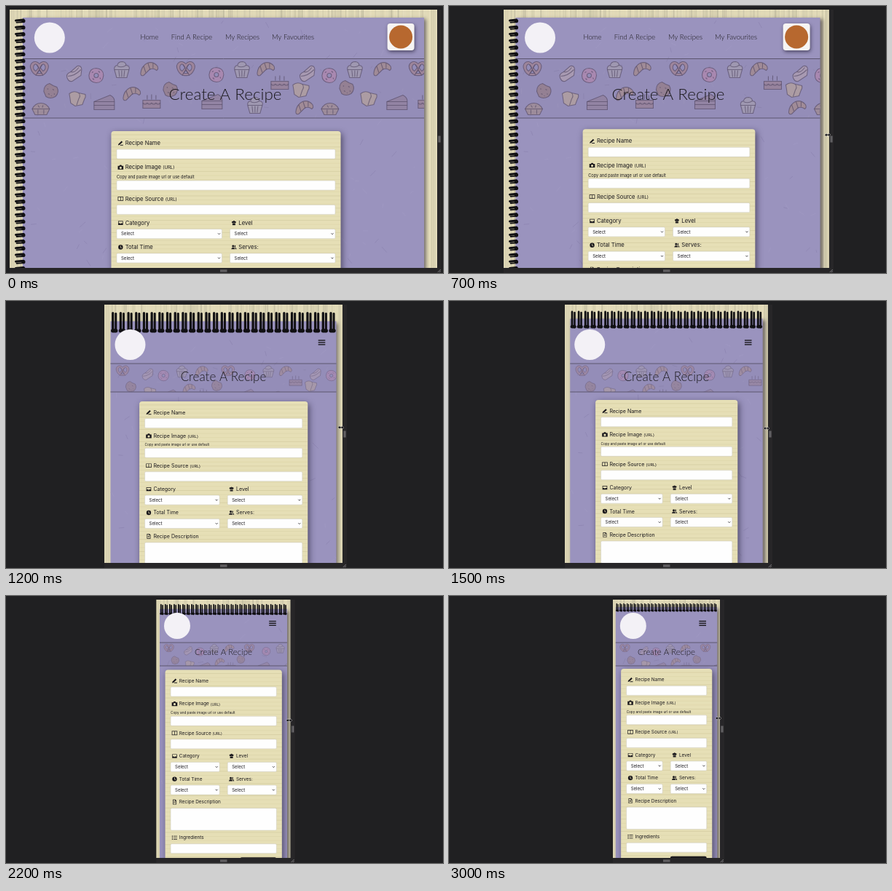
Recreate the animation shown at these times as an HTML page with a canvas. Size 600x367 px, loop 3100 ms.

```html
<!DOCTYPE html>
<html lang="en">
<head>
<meta charset="utf-8">
<title>Responsive recipe form</title>
<style>
  html, body { margin: 0; width: 100%; height: 100%; overflow: hidden; background: #202022; }
  canvas { display: block; width: 600px; height: 367px; }
</style>
</head>
<body>
<canvas></canvas>
<script>
const LOOP = 3100, STEP = 100, MID = 298.5, TOP = 5, BOTTOM = 360;
const INK = '#1b191d', BADGE = '#f3f1f6';
const canvas = document.querySelector('canvas');
const ctx = canvas.getContext('2d');
const ratio = window.devicePixelRatio || 1;
canvas.width = 600 * ratio;
canvas.height = 367 * ratio;

// Half the viewport width over time
const halfWidths = [[0, 293.5], [200, 287.3], [350, 274], [500, 254.5], [600, 238.5], [1000, 178.5],
  [1200, 163.5], [1500, 139.5], [1800, 105.5], [1900, 98], [2400, 88.5], [2500, 82.5], [3000, 73.5]];
const cursorHeights = [[0, 183], [500, 180], [1000, 173], [1500, 175], [1900, 172], [3000, 168]];

const layouts = {
  wide:   { lines: [72.5, 154], title: [301, 121, 22.4], label: 7.7, caption: 5.65, first: 16.5, row: 33.3, extra: 9.8, scale: 1 },
  medium: { lines: [86, 125], title: [298.5, 104, 17], label: 7, caption: 4.7, first: 15.2, row: 32.4, extra: 8.3, scale: .72 },
  small:  { lines: [64, 96], title: [298.5, 77.5, 11.4], label: 6.4, caption: 4.7, first: 15, row: 31.6, extra: 8.6, scale: .55 }
};

const icons = {
  pen: 'M-3 1.2L1.3-3 2.8-1.5-1.3 2.3-3.4 3ZM0 2.2H3.5V3.2H-1Z',
  camera: 'M-3.8-2H-1.8L-1-3.2H1L1.8-2H3.8V3H-3.8ZM-1.6.5a1.6 1.6 0 1 0 3.2 0a1.6 1.6 0 1 0-3.2 0Z',
  book: 'M-3.8-2.8H3.8V2.8H-3.8ZM-3.1-2.1V2.1H-.35V-2.1ZM.35-2.1V2.1H3.1V-2.1Z',
  tray: 'M-3.3-2.6H3.3V2.7H-3.3ZM-2.6-1.9V.4H-1Q0 2 1 .4H2.6V-1.9Z',
  hat: 'M-2 .2Q-4-1-2.4-2.3-1-2.2-1-2.4 0-4 1.2-2.4 1-2.2 2.4-2.3 4-1 2 .2ZM-2 .8H2V3H-2Z',
  clock: 'M-3.2 0a3.2 3.2 0 1 0 6.4 0a3.2 3.2 0 1 0-6.4 0ZM-.4-2H.3V0L1.7 1 1.3 1.5-.4.4Z',
  people: 'M-2.6-1.4a1.5 1.5 0 1 0 3 0a1.5 1.5 0 1 0-3 0ZM-3.6 2.8Q-3.4.4-1 .4 1.3.4 1.5 2.8ZM1-2.8Q3-2.4 2.2-.4L1 .2Q3.6.6 3.6 2.8H2.2Q2.2 1 .8.3Z',
  file: 'M-2.5-3.4H1L2.5-1.9V3.4H-2.5ZM-1.8-2.7V2.7H1.8V-1.4H.5V-2.7ZM-1.2-.6H1.2V0H-1.2ZM-1.2.8H1.2V1.4H-1.2Z',
  list: 'M-3.6-2.6h1.2v1.1h-1.2ZM-1.5-2.4h5v.7h-5ZM-3.6-.5h1.2v1.1h-1.2ZM-1.5-.3h5v.7h-5ZM-3.6 1.6h1.2v1.1h-1.2ZM-1.5 1.8h5v.7h-5Z'
};

// Pastry: fill, outline with holes, inner strokes
const pastries = {
  pretzel: ['#a4818c', 'M0-7C6-14 16-8 11 2Q7 10 0 9-7 10-11 2C-16-8-6-14 0-7ZM1-2Q5-10 8-4 9 1 5 3ZM-1-2Q-5-10-8-4-9 1-5 3ZM-3 6L0 2 3 6Z', 'M-5 9L4-6M5 9L-4-6'],
  eclair: ['#b4a1b0', 'M-10 6Q-12 1-5-2L4-10Q10-11 10-5L9 3-3 11Q-8 12-10 6Z', 'M-9 4Q0 4 9-5M-5-2Q0 0 6-8'],
  donut: ['#b486ad', 'M-10 0Q-9-10 0-10 10-9 10 0 9 10 0 10-10 9-10 0ZM-3 0a3 3 0 1 0 6 0a3 3 0 1 0-6 0', 'M-6-4l2-1M3-6l2 2M5 3l1 2M-5 4l2 2'],
  cupcake: ['#a79eae', 'M-10 0Q-11-5-6-6-5-11 1-11 6-10 6-6 12-5 10 0L7 11H-7Z', 'M-10 0H10M-4 1L-3 10M0 1V10M4 1L3 10M-6-5Q0-2 6-6'],
  croissant: ['#a88b86', 'M-12 6Q-11-4-3-8 5-11 11-4 13 0 10 2 5-2 0 1-4 5-8 9-12 10-12 6Z', 'M-8-4L-5 5M-2-8L1 1M5-8L5-1'],
  cake: ['#9a7f8f', 'M-12-1H12V10H-12Z', 'M-12 3Q-9 6-6 3-3 6 0 3 3 6 6 3 9 6 12 3M-6-2V-8M0-2V-9M6-2V-8'],
  cookie: ['#957a80', 'M-10 1Q-10-8-2-10L3-7 8-5Q12 2 6 8-1 12-7 8Z', 'M-5-3l1 1M2-2l2 1M-4 4l2 1M4 4l1 1M0 7l1 0'],
  toast: ['#bba599', 'M-11-6Q-5-11 2-7L11-5Q12-1 10 1L7 9-3 11-9 7-10 0Z', 'M2-7Q5-3 2 1L-1 10'],
  slice: ['#937f98', 'M-14-1L8-10Q14-7 14-2V10H-14Z', 'M-14-1H14M-14 4H14'],
  pie: ['#a48d8c', 'M-12 0Q-8-8 0-8 8-8 12 0L8 8H-8Z', 'M-12 0H12M-4-5L-2-2M3-5L2-2M-4 1V7M4 1V7']
};
const spots = {
  pretzel: [[23, 14], [224, 14], [543, 14]],
  eclair: [[71, 20], [391, 20]],
  donut: [[101, 23], [266, 22], [421, 23]],
  cupcake: [[136, 15], [301, 15], [456, 15], [319, 64]],
  croissant: [[174, 14], [334, 14], [494, 14], [150, 48], [387, 67]],
  cake: [[353, 32], [177, 58], [555, 58]],
  cookie: [[39, 44], [203, 42], [445, 40]],
  toast: [[75, 54], [475, 54], [382, 42]],
  slice: [[112, 60], [260, 59], [514, 60]],
  pie: [[25, 69], [422, 69]]
};

const random = (i, salt) => {
  const v = Math.sin(i * 12.9898 + salt * 78.233) * 43758.5453;
  return v - Math.floor(v);
};

function track(keys, t) {
  const i = keys.findIndex(k => k[0] >= t);
  if (i < 0) return keys[keys.length - 1][1];
  if (i === 0) return keys[0][1];
  const [[t0, a], [t1, b]] = [keys[i - 1], keys[i]];
  return a + (b - a) * (t - t0) / (t1 - t0);
}

function rect(x, y, w, h, fill) {
  ctx.fillStyle = fill;
  ctx.fillRect(x, y, w, h);
}

function box(x, y, w, h, r, fill, stroke) {
  ctx.beginPath();
  ctx.roundRect(x, y, w, h, r);
  ctx.fillStyle = fill;
  ctx.fill();
  if (stroke) { ctx.strokeStyle = stroke; ctx.lineWidth = .5; ctx.stroke(); }
}

function disc(x, y, r, fill) {
  ctx.beginPath();
  ctx.arc(x, y, r, 0, 7);
  ctx.fillStyle = fill;
  ctx.fill();
}

function line(x1, y1, x2, y2, width, color) {
  ctx.beginPath();
  ctx.moveTo(x1, y1);
  ctx.lineTo(x2, y2);
  ctx.lineWidth = width;
  ctx.strokeStyle = color;
  ctx.stroke();
}

function text(str, x, y, size, font = 'Inter', align = 'left') {
  ctx.font = `${font === 'Lato' ? 300 : 400} ${size}px ${font}, sans-serif`;
  ctx.textAlign = align;
  ctx.textBaseline = 'alphabetic';
  ctx.fillStyle = INK;
  ctx.fillText(str, x, y + size * .35);
  return ctx.measureText(str).width;
}

function shadowed(blur, dx, dy, draw) {
  ctx.save();
  ctx.shadowColor = 'rgba(25,20,40,.6)';
  ctx.shadowBlur = blur * ratio;
  ctx.shadowOffsetX = dx * ratio;
  ctx.shadowOffsetY = dy * ratio;
  draw();
  ctx.restore();
}

function drawWood(left, right) {
  rect(left, TOP, right - left, BOTTOM - TOP, '#dfd8b7');
  const shades = ['#eee6c5', '#c9c3a4', '#b3ae95', '#e8dfb9'];
  for (let x = left, i = 0; x < right; x += 2.4, i++) {
    ctx.globalAlpha = .15 + random(i, 1) * .4;
    rect(x, TOP, 1 + random(i, 2) * 1.4, BOTTOM - TOP, shades[Math.floor(random(i, 3) * 4)]);
  }
  ctx.globalAlpha = 1;
}

function drawPaper(x, y, w) {
  shadowed(5, 3, 2, () => rect(x, y, w, 380, '#9a93be'));
  ctx.save();
  ctx.beginPath();
  ctx.rect(x, y, w, BOTTOM - y);
  ctx.clip();
  for (let i = 0; i < 150; i++) {
    const px = x + random(i, 4) * 550, py = y + random(i, 5) * 350;
    line(px, py, px + random(i, 6) * 16 - 8, py + random(i, 7) * 16 - 8, .7,
      i % 2 ? 'rgba(80,70,120,.2)' : 'rgba(190,180,220,.2)');
  }
  ctx.restore();
}

function drawBanner(x, w, { lines: [y0, y1], title, scale }) {
  ctx.save();
  ctx.beginPath();
  ctx.rect(x, y0, w, y1 - y0);
  ctx.clip();
  rect(x, y0, w, y1 - y0, 'rgba(120,112,150,.16)');
  ctx.translate(x, y0);
  ctx.scale(scale, scale);
  ctx.globalAlpha = scale === 1 ? .65 : .45;
  ctx.lineWidth = 1.1;
  ctx.strokeStyle = '#554b66';
  for (const kind in spots) {
    const [fill, outline, detail] = pastries[kind];
    for (const [px, py] of spots[kind]) {
      ctx.save();
      ctx.translate(px, py);
      const shape = new Path2D(outline);
      ctx.fillStyle = fill;
      ctx.fill(shape, 'evenodd');
      ctx.stroke(shape);
      ctx.stroke(new Path2D(detail));
      ctx.restore();
    }
  }
  ctx.restore();
  for (const y of [y0, y1]) line(x, y, x + w, y, 1, '#5d566f');
  text('Create A Recipe', ...title, 'Lato', 'center');
}

function drawSideRings(left, pageX) {
  const x0 = left + 8.5, x1 = pageX + 1;
  ctx.lineCap = 'round';
  for (let y = 19; y < BOTTOM; y += 9.2) {
    line(x0, y + 1, x1, y, 3, '#111013');
    line(x0 + 1, y + 3.6, x1, y + 3, 1.8, '#111013');
    disc(x1, y + 1.5, 2.6, '#111013');
  }
  ctx.lineCap = 'butt';
}

function drawTopRings(x, w, y, h) {
  const pitch = w / 29;
  ctx.lineCap = 'round';
  for (let i = 0; i < 29; i++) {
    const rx = x + (i + .3) * pitch;
    line(rx, y + 1, rx, y + h - 2, pitch * .3, '#111013');
    line(rx + pitch * .38, y + 2, rx + pitch * .38, y + h - 1, pitch * .28, '#111013');
    line(rx, y + h - 2, rx + pitch * .38, y + h - 2, pitch * .5, '#111013');
  }
  ctx.lineCap = 'butt';
}

function drawField(x, y, w, isSelect, h = 13) {
  box(x, y, w, h, 1.5, '#fefefe', '#cbc8bf');
  if (!isSelect) return;
  text('Select', x + 6, y + 6.5, 6.1);
  const cx = x + w - 4;
  ctx.beginPath();
  ctx.moveTo(cx - 1.5, y + 5.7);
  ctx.lineTo(cx, y + 7.2);
  ctx.lineTo(cx + 1.5, y + 5.7);
  ctx.strokeStyle = INK;
  ctx.lineWidth = .8;
  ctx.stroke();
}

function drawLabel(icon, label, x, y, size, note) {
  ctx.save();
  ctx.translate(x + 5.4, y);
  ctx.fillStyle = INK;
  ctx.fill(new Path2D(icons[icon]), 'evenodd');
  ctx.restore();
  const width = text(label, x + 11.8, y, size);
  if (note) text(note, x + 11.8 + width + size * .3, y + .6, size * .78);
}

function drawForm(center, top, w, { label, caption, first, row, extra }) {
  const x = center - w / 2, inner = x + 7.5, fieldW = w - 15;
  shadowed(8, 2, 3, () => box(x, top, w, 300, 4, '#e6dfb6'));
  for (let y = top + 5, i = 0; y < BOTTOM; y += 5.6, i++)
    line(x, y, x + w, y, .7, i % 3 ? 'rgba(160,148,98,.14)' : 'rgba(150,138,90,.25)');

  let y = top + first;
  const name = (icon, str, note) => drawLabel(icon, str, inner, y, label, note);
  const pair = (iconA, a, iconB, b) => {
    const half = fieldW / 2 - 5.5;
    name(iconA, a);
    drawLabel(iconB, b, center + 5.5, y, label);
    drawField(inner, y + 8.5, half, true);
    drawField(center + 5.5, y + 8.5, half, true);
    y += row;
  };

  name('pen', 'Recipe Name');
  drawField(inner, y + 8.5, fieldW);
  y += row;
  name('camera', 'Recipe Image', '(URL)');
  text('Copy and paste image url or use default', inner, y + 5 + extra * .88, caption);
  drawField(inner, y + 8.5 + extra, fieldW);
  y += row + extra;
  name('book', 'Recipe Source', '(URL)');
  drawField(inner, y + 8.5, fieldW);
  y += row;
  pair('tray', 'Category', 'hat', 'Level');
  pair('clock', 'Total Time', 'people', 'Serves:');
  name('file', 'Recipe Description');
  drawField(inner, y + 8.5, fieldW, false, 30.4);
  y += row + 17.4;
  name('list', 'Ingredients');
  drawField(inner, y + 8.5, fieldW);
  box(inner + fieldW - 50, y + 27, 50, 12, 2.5, INK);
}

function drawWide(left, right, w) {
  const layout = layouts.wide;
  const x = left + 12 + w * .01, pageR = right + 5 - w * .039;
  drawPaper(x, 16, pageR - x);
  drawBanner(x, pageR - x, layout);
  drawSideRings(left, x);
  disc(left + 34.6 + w * .0345, 43.5, 21, BADGE);
  const avatarX = pageR - 50.5 + (w - 587) * .003;
  shadowed(5, 1, 2, () => box(avatarX, 24, 37, 37, 4, '#f6f4f3'));
  disc(avatarX + 18.5, 42.5, 16, '#b7682f');
  const k = w > 420 ? 1 : .775, size = w > 420 ? 9.5 : 8;
  [['Home', -107], ['Find A Recipe', -49], ['My Recipes', 20.5], ['My Favourites', 90]]
    .forEach(([str, dx]) => text(str, 304 + dx * k, 42.5, size, 'Lato', 'center'));
  drawForm(302, 160.6 + .0194 * w, .56 * w - 13.6, layout);
}

function drawNarrow(left, right, w) {
  const medium = w > 269, layout = medium ? layouts.medium : layouts.small;
  const x = left + w * .026, pageW = w * .948;
  const ringY = TOP + pageW * .034, ringH = pageW * .088;
  drawPaper(x, ringY + ringH * .45, pageW);
  drawBanner(x, pageW, layout);
  drawTopRings(x, pageW, ringY, ringH);
  if (medium) disc(x + 27, 60, 21, BADGE);
  else disc(x + 24, 41, 18, BADGE);
  const menuX = x + pageW - 20, menuY = medium ? 57 : 37.5;
  for (const dy of [-2.9, 0, 2.9]) line(menuX - 4.8, menuY + dy, menuX + 4.8, menuY + dy, 1.4, INK);
  if (medium) drawForm(298.7, 124.8 + .04 * w, .75 * w - 14, layout);
  else drawForm(298.7, 94.2 + .04 * w, .935 * w - 12.3, layout);
}

function drawCursor(x, y) {
  ctx.save();
  ctx.translate(x, y);
  const arrows = new Path2D('M-4 0L-1.5-2V-.6H1.5V-2L4 0 1.5 2V.6H-1.5V2Z');
  ctx.strokeStyle = '#e6e3e6';
  ctx.lineWidth = .8;
  ctx.stroke(arrows);
  ctx.fillStyle = '#0b0b0c';
  ctx.fill(arrows);
  ctx.restore();
}

function drawFrame(t) {
  const half = track(halfWidths, t), w = half * 2;
  const left = MID - half, right = MID + half;
  ctx.setTransform(ratio, 0, 0, ratio, 0, 0);
  rect(0, 0, 600, 367, '#202022');

  ctx.save();
  ctx.beginPath();
  ctx.rect(left, TOP, w, BOTTOM - TOP);
  ctx.clip();
  drawWood(left, right);
  (w > 347 ? drawWide : drawNarrow)(left, right, w);
  ctx.restore();

  // Resize handles around the viewport
  rect(left, BOTTOM, w + 6, 7, '#272628');
  rect(right, TOP, 6, BOTTOM - TOP, '#272628');
  for (const d of [-.9, .9]) {
    line(right + 3 + d, 178.5, right + 3 + d, 187.5, .9, '#929094');
    line(294, 364 + d, 303.5, 364 + d, .9, '#929094');
  }
  line(right + .8, 366, right + 4.8, 362, .7, '#a09ea2');
  line(right + 3, 366, right + 4.8, 364.2, .7, '#a09ea2');
  if (t > 0) drawCursor(right - 2, track(cursorHeights, t));
}

let shown = -1;
function tick() {
  const t = Math.floor(performance.now() % LOOP / STEP) * STEP;
  if (t !== shown) drawFrame(shown = t);
  requestAnimationFrame(tick);
}
tick();
</script>
</body>
</html>
```
